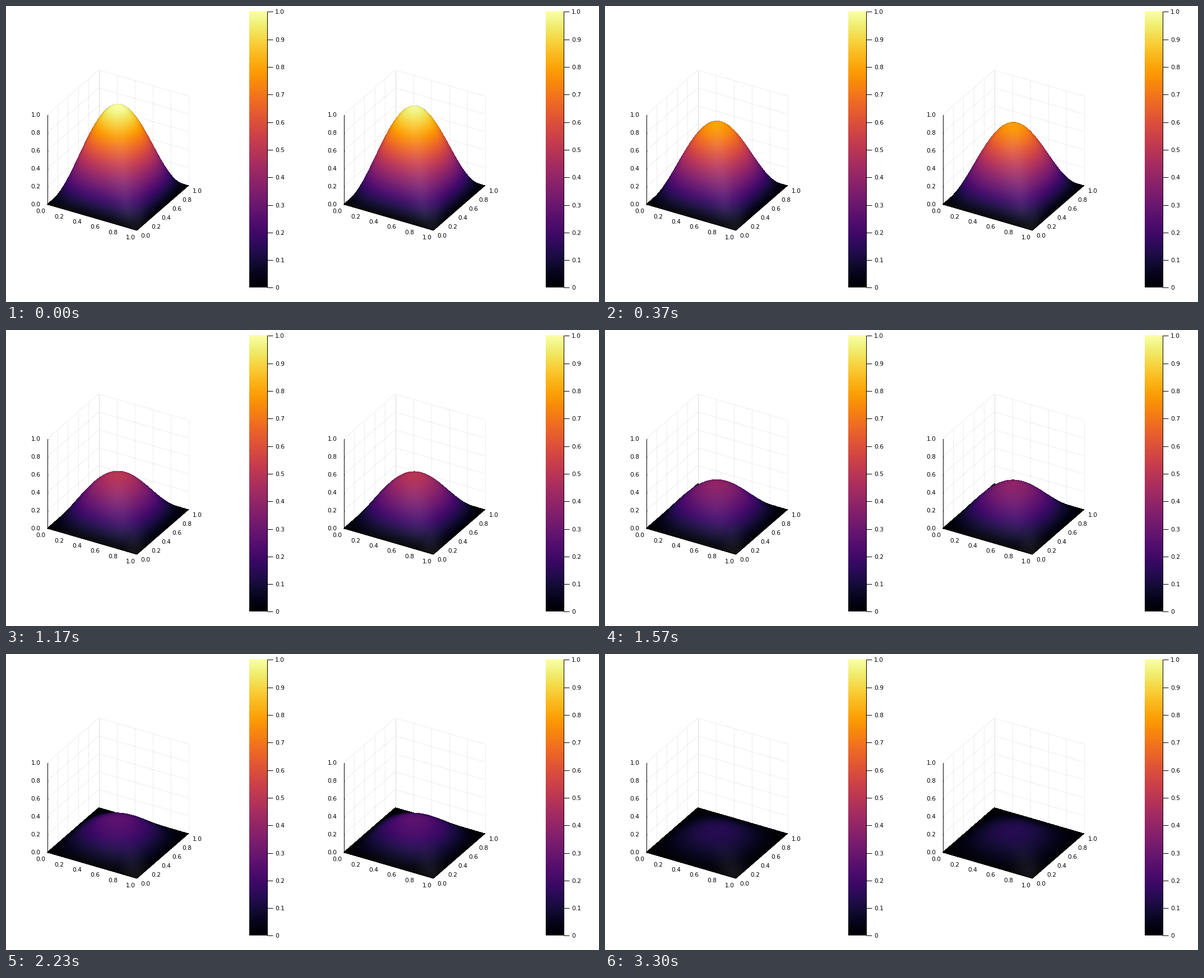
A matplotlib script for the animation above (3.36 s loop, 1058 by 529 pixels).

```python
import numpy as np
import matplotlib.pyplot as plt
from matplotlib.animation import FuncAnimation

W, H, DPI = 1058, 529, 64
PT = 72 / DPI                      # one pixel in points
LOOP_MS, STEPS = 3360, 101
PANEL = 529                        # horizontal distance between the two plots
RATE = 2 * np.pi ** 2 * 0.001      # decay of the first heat mode per step
TICKS = np.linspace(0, 1, 6)
SAMPLES = 600
BOX_X, BOX_Y, BOX_W, BOX_H = 70, 168, 260, 236
VIEW = np.array([0.432, -0.751, 0.5])   # unit vector towards the viewer

plt.rcParams["font.family"] = "DejaVu Sans"
cmap = plt.get_cmap("inferno")


def project(x, y, z):
    """Orthographic view of the unit cube in stage pixels."""
    return 73.5 + 160 * x + 92 * y, 354.5 + 46.5 * x - 80 * y - 160 * z


fig = plt.figure(figsize=(W / DPI, H / DPI), dpi=DPI, facecolor="white")
ax = fig.add_axes([0, 0, 1, 1])
ax.set_xlim(0, W)
ax.set_ylim(H, 0)
ax.axis("off")


def line(xs, ys, width=1.0, **style):
    ax.plot(xs, ys, lw=width * PT, solid_capstyle="butt", **style)


def segment(start, end, dx, **style):
    (x0, y0), (x1, y1) = project(*start), project(*end)
    line([x0 + dx, x1 + dx], [y0, y1], **style)


def label(x, y, text, ha="center"):
    ax.text(x, y, text, size=10.67 * PT, ha=ha, va="center_baseline")


def draw_cube(dx):
    grid = dict(color="black", alpha=0.1, width=0.7, zorder=1)
    for t in TICKS:
        segment((0, t, 0), (0, t, 1), dx, **grid)
        segment((t, 1, 0), (t, 1, 1), dx, **grid)
        segment((0, 0, t), (0, 1, t), dx, **grid)
        segment((0, 1, t), (1, 1, t), dx, **grid)

    axis = dict(color="black", zorder=4)
    segment((0, 0, 0), (0, 0, 1), dx, **axis)
    segment((0, 0, 0), (1, 0, 0), dx, **axis)
    segment((1, 0, 0), (1, 1, 0), dx, **axis)
    for t in TICKS:
        text = f"{t:.1f}"
        x, y = project(0, 0, t)
        line([x + dx, x + dx + 1.8], [y, y], **axis)
        label(x + dx - 12, y - 0.3, text, ha="right")
        x, y = project(t, 0, 0)
        label(x + dx - 11.2, y + 12, text)
        x, y = project(1, t, 0)
        label(x + dx + 15.8, y + 9.4, text)


def draw_colorbar(dx):
    top, bottom = 10.4, 503.4
    ax.imshow(np.linspace(1, 0, 256)[:, None], cmap=cmap, aspect="auto",
              extent=(433.5 + dx, 465.5 + dx, 503.5, 10),
              interpolation="nearest", zorder=2)
    line([465.5 + dx] * 2, [top, bottom], color="black", zorder=4)
    for i in range(11):
        y = bottom + (top - bottom) * i / 10
        line([465.5 + dx, 476 + dx], [y, y], color="black", zorder=4)
        label(480.3 + dx, y, f"{i / 10:.1f}" if i else "0", ha="left")


# Samples run from the back corner to the front one, so nearer points win.
u = (np.arange(SAMPLES) + 0.5) / SAMPLES
gx, gy = (g.ravel() for g in np.meshgrid(u, u[::-1]))
mode = np.sin(np.pi * gx) * np.sin(np.pi * gy)
slope_x = np.pi * np.cos(np.pi * gx) * np.sin(np.pi * gy)
slope_y = np.pi * np.sin(np.pi * gx) * np.cos(np.pi * gy)
base_x, base_y = project(gx, gy, 0)
cols = np.floor(base_x - BOX_X).astype(int)
order = np.arange(gx.size)

# Soft sheen around the corner nearest to the viewer.
toward = (gx - gy) / 2
corner = (0.08 * np.exp(-((gx + gy - 1) / 0.2) ** 2)
          * np.clip((toward - 0.1) / 0.3, 0, 1))


def shade(colors, height, front):
    """Lighten what faces the viewer and darken what is seen edge-on."""
    sx, sy = height * slope_x[front], height * slope_y[front]
    facing = VIEW[2] - VIEW[0] * sx - VIEW[1] * sy
    facing = np.clip(facing / np.sqrt(1 + sx ** 2 + sy ** 2), 0, 1)
    white = np.maximum(corner[front], 0.1 * facing ** 8)
    dark = 0.3 * (1 - facing) ** 5
    lit = colors * (1 - dark)[:, None]
    return lit + (1 - lit) * white[:, None]


def render(height):
    rows = np.floor(base_y - 160 * height * mode - BOX_Y).astype(int)
    owner = np.full(BOX_W * BOX_H, -1)
    owner[rows * BOX_W + cols] = order
    seen = owner >= 0
    front = owner[seen]
    pixels = np.zeros((BOX_W * BOX_H, 4))
    pixels[seen, :3] = shade(cmap(height * mode[front])[:, :3], height, front)
    pixels[seen, 3] = 1
    return pixels.reshape(BOX_H, BOX_W, 4)


def heights(step):
    """Exact decay on the left, implicit Euler one step ahead on the right."""
    return np.exp(-RATE * step), (1 + RATE) ** -(step + 1)


surfaces = []
for dx, height in zip((0, PANEL), heights(0)):
    draw_cube(dx)
    draw_colorbar(dx)
    left = BOX_X + dx
    surfaces.append(ax.imshow(
        render(height), aspect="auto", interpolation="nearest", zorder=3,
        extent=(left, left + BOX_W, BOX_Y + BOX_H, BOX_Y)))


def update(step):
    for surface, height in zip(surfaces, heights(step)):
        surface.set_data(render(height))
    return surfaces


anim = FuncAnimation(fig, update, frames=STEPS, interval=LOOP_MS / STEPS,
                     repeat=True, repeat_delay=0, blit=False)
plt.show()
```
